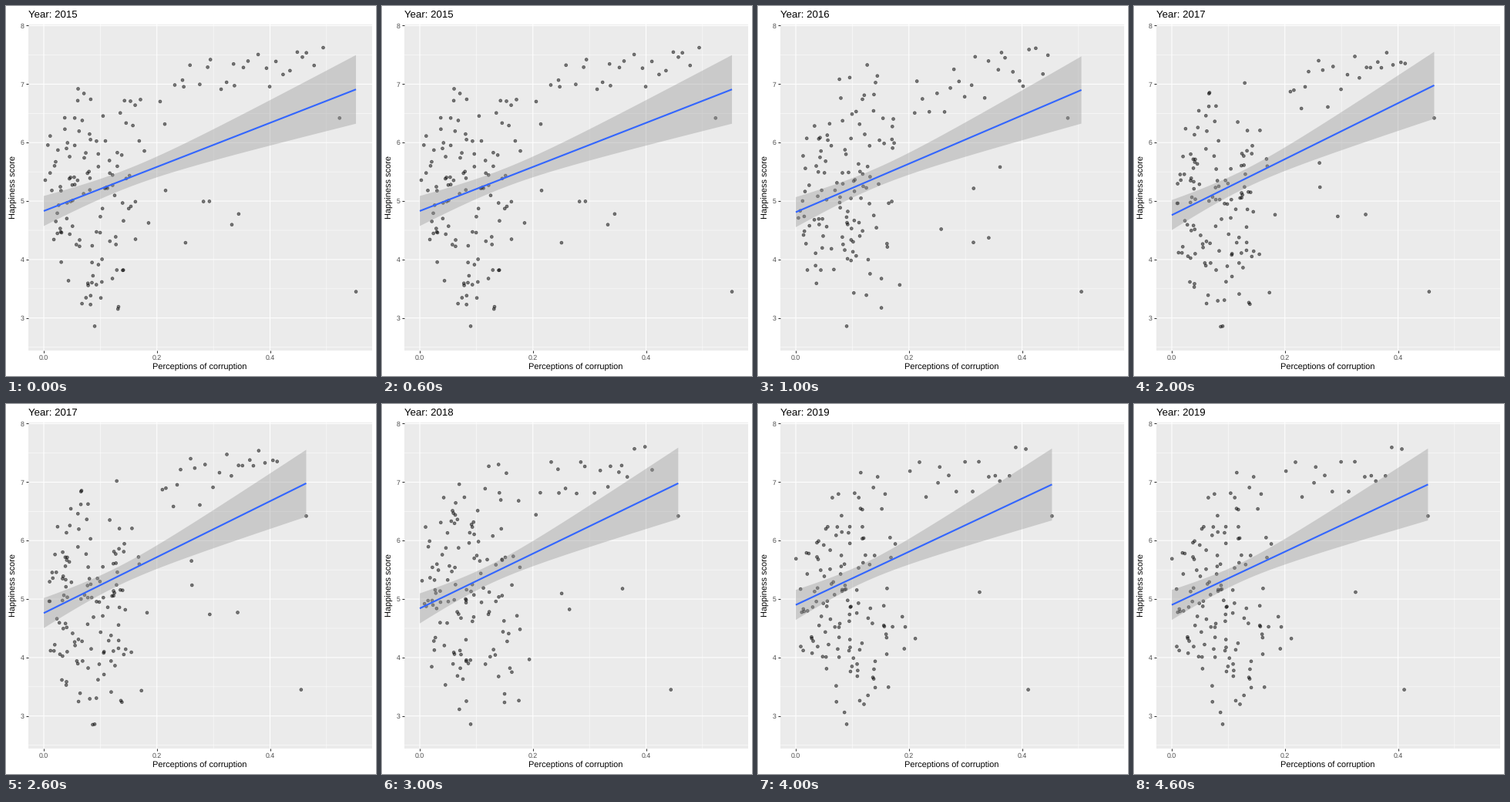
Animation, 480 px wide and 480 px high, one loop 5 s. Source, as a matplotlib script:

```python
import numpy as np
import matplotlib.pyplot as plt
from matplotlib.animation import FuncAnimation

SIZE, DPI = 480, 72
LEFT, RIGHT, TOP, BOTTOM = 28.7, 474.5, 23.9, 447.1
X0, X_SCALE = 49.0, 733.75
Y8, Y_SCALE = 25.5, 75.85
TOTAL = 155

# Per year: line start, line end, band half-width at the end,
# x of the lone low point and x of the high point at the edge.
YEARS = {
    2015: (4.83, 6.91, 0.587, 0.552, 0.523),
    2016: (4.81, 6.90, 0.575, 0.505, 0.481),
    2017: (4.76, 6.98, 0.573, 0.455, 0.464),
    2018: (4.84, 6.98, 0.610, 0.444, 0.457),
    2019: (4.90, 6.96, 0.615, 0.411, 0.453),
}
WAIST, BAND_START = 0.16, 0.257


def px(x):
    return X0 + x * X_SCALE


def py(y):
    return Y8 + (8 - y) * Y_SCALE


def scores(year):
    """Three extremes, two sparse groups on the right, a dense cloud on the left."""
    rng = np.random.default_rng(year)
    lone, edge = YEARS[year][3:]
    step = year - min(YEARS)
    extremes = np.array([(lone, 3.45), (edge, 6.42), (0.09, 2.86)])

    n = 26 - 5 * step // 2
    t = (np.arange(n) + rng.random(n)) / n
    x = 0.2 + (0.9 * max(lone, edge) - 0.2) * t
    y = 6.8 + 0.6 * t + (0.55 - 0.3 * t) * rng.uniform(-1, 1, n)
    upper = np.column_stack([x, y])

    n = 6 - step
    lower = rng.uniform((0.2, 4.25), (0.4, 5.7), (n, 2))

    n = TOTAL - len(extremes) - len(upper) - len(lower)
    x = 0.195 * rng.beta(1.6, 2.0, n)
    spread = np.minimum(1.1 + 14 * x, 2.3)
    y = 5.1 + spread * (2 * rng.beta(1.7, 1.7, n) - 1)
    return np.vstack([extremes, upper, lower, np.column_stack([x, y])])


def regression(year):
    """Line and the hyperbolic confidence band around it."""
    y_start, y_end, h_end, lone, edge = YEARS[year]
    t = np.linspace(0, 1, 80)
    x = t * max(lone, edge)
    y = y_start + (y_end - y_start) * t
    a = np.sqrt(BAND_START**2 - WAIST**2)
    b = np.sqrt(h_end**2 - WAIST**2)
    half = np.hypot(WAIST, (a + b) * t - a)
    band = np.column_stack([np.r_[x, x[::-1]],
                            np.r_[y + half, (y - half)[::-1]]])
    return x, y, band


plt.rcParams.update({"font.family": "Liberation Sans", "text.hinting": "none"})
fig = plt.figure(figsize=(SIZE / DPI, SIZE / DPI), dpi=DPI, facecolor="white")
ax = fig.add_axes([LEFT / SIZE, 1 - BOTTOM / SIZE,
                   (RIGHT - LEFT) / SIZE, (BOTTOM - TOP) / SIZE],
                  facecolor="#EBEBEB")
ax.spines[:].set_visible(False)


def label(x, y, text, size, color="black", **kw):
    return fig.text(x / SIZE, 1 - y / SIZE, text, fontsize=size, color=color,
                    va="baseline", **kw)


def grid(draw, values, width):
    for v in values:
        draw(v, color="white", lw=width, zorder=0).set_snap(False)


x_ticks, y_ticks = [0, 0.2, 0.4], range(3, 9)
grid(ax.axvline, [0.1, 0.3, 0.5], 0.53)
grid(ax.axhline, np.arange(2.5, 8), 0.53)
grid(ax.axvline, x_ticks, 1.07)
grid(ax.axhline, y_ticks, 1.07)
ax.set_xticks(x_ticks, [""] * len(x_ticks))
ax.set_yticks(y_ticks, [""] * len(y_ticks))
ax.tick_params(length=2.75, width=1.07, color="#333333")

for v in x_ticks:
    label(px(v), 459, f"{v:.1f}", 8.8, "#4D4D4D", ha="center")
for v in y_ticks:
    label(23.8, py(v) + 3.2, str(v), 8.8, "#4D4D4D", ha="right")
mid_x, mid_y = (LEFT + RIGHT) / 2, (TOP + BOTTOM) / 2
label(mid_x, 472, "Perceptions of corruption", 11, ha="center")
label(13, mid_y, "Happiness score", 11, ha="center",
      rotation=90, rotation_mode="anchor")
title = label(LEFT, 15, "", 13.2)

# One size per dot keeps the dots at sub-pixel positions.
dots = ax.scatter(*scores(min(YEARS)).T, s=np.full(TOTAL, 3.9**2),
                  facecolor=(0, 0, 0, 0.5), edgecolor=(0, 0, 0, 0.5),
                  linewidth=0.71, zorder=2)
ribbon, = ax.fill([0, 0, 0], [5, 5, 5], color="#999999", alpha=0.4,
                  linewidth=0, zorder=3)
trend, = ax.plot([], [], color="#3366FF", lw=2.13,
                 solid_capstyle="butt", zorder=4)
ax.set_xlim((LEFT - X0) / X_SCALE, (RIGHT - X0) / X_SCALE)
ax.set_ylim(8 - (BOTTOM - Y8) / Y_SCALE, 8 - (TOP - Y8) / Y_SCALE)


def update(year):
    x, y, band = regression(year)
    title.set_text(f"Year: {year}")
    dots.set_offsets(scores(year))
    ribbon.set_xy(band)
    trend.set_data(x, y)
    return title, dots, ribbon, trend


anim = FuncAnimation(fig, update, frames=list(YEARS), interval=1000,
                     repeat=True, repeat_delay=0, blit=False)
plt.show()
```
